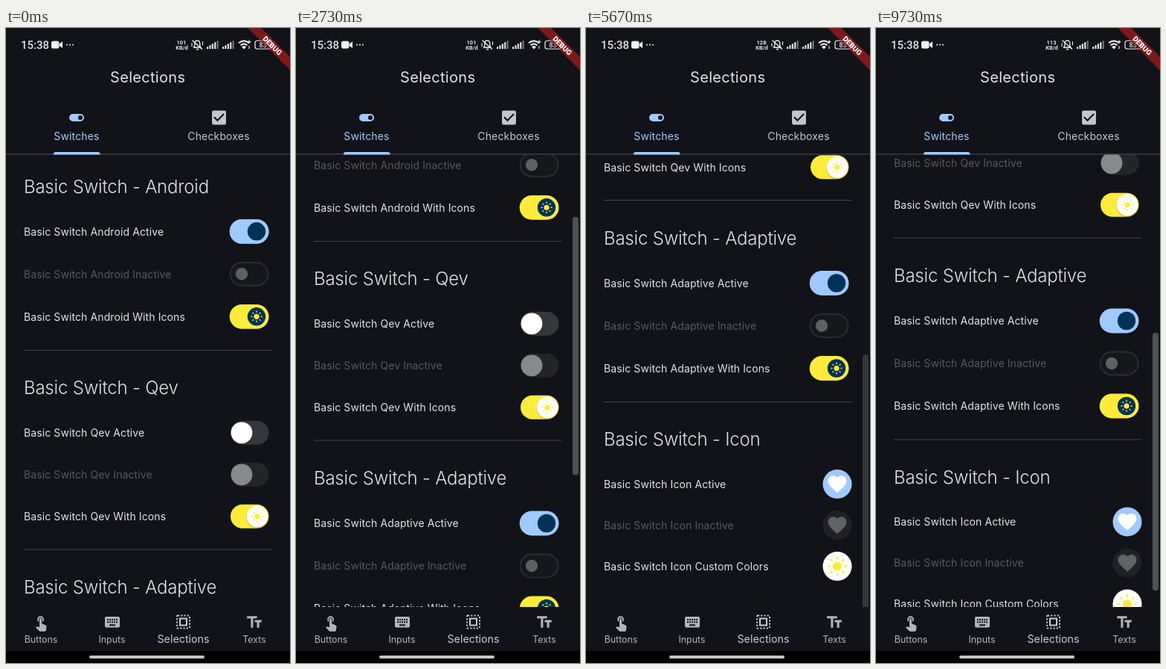
An HTML page that plays this animation: 382 by 850 pixels, repeating every 9760 ms.

```html
<!DOCTYPE html>
<html lang="en">
<head>
<meta charset="utf-8">
<title>Selections</title>
<style>
  html, body { margin: 0; width: 100%; height: 100%; overflow: hidden; background: #111318; }
  svg { display: block; }
  text { font-family: Inter, "Noto Sans", sans-serif; fill: #e2e2e9; }
  .heading { font-size: 24px; font-weight: 300; letter-spacing: -.2px; }
  .row { font-size: 14px; letter-spacing: .1px; }
  .off { fill: #58595d; }
  .mid { text-anchor: middle; }
  .status { font-family: Roboto, sans-serif; font-weight: 500; }
  .rate { font-size: 7.5px; font-weight: 700; }
  .banner { font: 900 9.9px Roboto, sans-serif; fill: #fff; }
</style>
</head>
<body>
<svg id="stage" width="382" height="850" viewBox="0 0 382 850"></svg>
<script>
const LOOP = 9760;
const BG = '#111318', BLUE = '#a0c9ff', NAVY = '#003258', YELLOW = '#ffeb3b', GREY = '#c3c6cf', LINE = '#43474e';

const text = (x, y, s, cls = '', attrs = '') => `<text x="${x}" y="${y}" class="${cls}" ${attrs}>${s}</text>`;
const rect = (x, y, w, h, r, fill, attrs = '') =>
  `<rect x="${x}" y="${y}" width="${w}" height="${h}" rx="${r}" fill="${fill}" ${attrs}/>`;
const circle = (x, y, r, fill, attrs = '') => `<circle cx="${x}" cy="${y}" r="${r}" fill="${fill}" ${attrs}/>`;
const stroke = (d, color, width, attrs = '') =>
  `<path d="${d}" fill="none" stroke="${color}" stroke-width="${width}" ${attrs}/>`;
// 24-unit icon centred on x, y
const icon = (d, x, y, fill, scale = 1, attrs = '') =>
  `<path d="${d}" fill="${fill}" transform="translate(${x} ${y}) scale(${scale}) translate(-12 -12)" ${attrs}/>`;

const TOGGLE = 'M17 7H7a5 5 0 0 0 0 10h10a5 5 0 0 0 0-10zm0 8a3 3 0 1 1 0-6 3 3 0 0 1 0 6z';
const CHECK = 'M19 3H5a2 2 0 0 0-2 2v14a2 2 0 0 0 2 2h14a2 2 0 0 0 2-2V5a2 2 0 0 0-2-2zm-9 14l-5-5 1.4-1.4L10 14.2l7.6-7.6L19 8z';
const HEART = 'M12 21.35l-1.45-1.32C5.4 15.36 2 12.28 2 8.5 2 5.42 4.42 3 7.5 3c1.74 0 3.41.81 4.5 2.09C13.09 3.81 14.76 3 16.5 3 19.58 3 22 5.42 22 8.5c0 3.78-3.4 6.86-8.55 11.54z';
const TOUCH = 'M9 11.2V7.5a2.5 2.5 0 0 1 5 0v3.7a4.5 4.5 0 1 0-5 0zm9.8 4.7l-4.5-2.3-.5-.1H13v-6a1.5 1.5 0 0 0-3 0v10.7l-3.4-.7q-.6-.1-1 .3l-.8.8 4.9 5q.5.4 1.1.4h6.8q1.2-.1 1.4-1.3l.8-5.3q0-1-1-1.5z';
const LETTERS = 'M2.5 4v3h5v12h3V7h5V4zm19 5h-9v3h3v7h3v-7h3z';

function sun(x, y, scale, color) {
  let rays = '';
  for (let i = 0; i < 8; i++) rays += `<path d="M0-6V-8.3" transform="rotate(${i * 45})"/>`;
  return `<g transform="translate(${x} ${y}) scale(${scale})" stroke="${color}" stroke-width="1.6">${rays}${circle(0, 0, 3.9, color, 'stroke="none"')}</g>`;
}

// Right-hand controls, each centred on y
const track = (y, fill, attrs = '') => rect(300.7, y - 16.4, 52.8, 32.8, 16.4, fill, attrs);
const pill = (y, fill) => rect(302, y - 16, 51.5, 32, 16, fill);
const badge = (y, fill, attrs = '') => circle(338, y, 19.5, fill, attrs);
const raised = (x, y) => circle(x, y + 1.2, 15.2, '#0002') + circle(x, y, 14.4, '#fff');
const outlined = (y, fill, line) =>
  rect(301.7, y - 15.4, 50.8, 30.8, 15.4, fill, `stroke="${line}" stroke-width="2"`);
const controls = {
  live: y => outlined(y, '#33353a', '#8e9099') + track(y, BLUE, 'id="liveTrack"') + circle(337, y, 12.2, NAVY, 'id="liveThumb"'),
  on: y => track(y, BLUE) + circle(337, y, 12.2, NAVY),
  disabled: y => outlined(y, '#15171b', '#2c2d32') + circle(317, y, 8.2, '#5f6064'),
  sunny: y => track(y, YELLOW) + circle(337, y, 12.2, NAVY) + sun(337, y, .92, YELLOW),
  flat: y => pill(y, '#36373b') + raised(317, y),
  flatDisabled: y => pill(y, '#232529') + circle(317, y, 14.4, '#88898b'),
  flatSunny: y => pill(y, YELLOW) + raised(338, y) + sun(338, y, .92, YELLOW),
  heart: y => badge(y, BLUE, 'id="heartBadge"') + icon(HEART, 338, y, '#fff', 1.25, 'id="heart"'),
  heartDisabled: y => badge(y, '#1f2125') + icon(HEART, 338, y, '#616266', 1.25),
  sunBadge: y => badge(y, '#fff') + sun(338, y, 1.55, YELLOW)
};

const sections = [
  ['Android', 212, 272.3, 57, ['Active', 'live'], ['Inactive', 'disabled'], ['With Icons', 'sunny']],
  ['Qev', 481.5, 541.8, 56, ['Active', 'flat'], ['Inactive', 'flatDisabled'], ['With Icons', 'flatSunny']],
  ['Adaptive', 748.5, 809, 57, ['Active', 'on'], ['Inactive', 'disabled'], ['With Icons', 'sunny']],
  ['Icon', 1018, 1078, 55, ['Active', 'heart'], ['Inactive', 'heartDisabled'], ['Custom Colors', 'sunBadge']]
];

function list() {
  let out = '';
  for (const [name, top, first, step, ...rows] of sections) {
    out += text(24, top + 8.5, 'Basic Switch - ' + name, 'heading');
    rows.forEach(([label, kind], i) => {
      const y = first + i * step;
      out += text(24, y + 5.2, `Basic Switch ${name} ${label}`, label === 'Inactive' ? 'row off' : 'row') + controls[kind](y);
    });
  }
  for (const y of [431.5, 698, 968]) out += rect(24, y - .5, 333.5, 1, 0, LINE);
  return out;
}

function signal(x) {
  let out = '';
  for (let i = 0; i < 5; i++) out += rect(x + i * 3.4, 25 - i * 2, 2.1, 3 + i * 2, .5, i < 4 ? '#e8e8e8' : '#777');
  return out;
}

function statusBar() {
  const ink = '#f2f2f2';
  return text(20, 28, '15:38', 'status', 'font-size="15"') +
    rect(61, 17.5, 10.5, 10, 2.5, ink) + `<path d="M72 21l4-3v9l-4-3z" fill="${ink}"/>` +
    [82, 86, 90].map(x => circle(x, 22.5, 1, ink)).join('') +
    text(236, 21.7, '', 'status mid rate', 'id="rate"') + text(236.5, 29.2, 'KB/d', 'status mid rate') +
    stroke('M252.5 26h9.5l-1.2-2.5V21q0-3.800-3.500-4.300-3.500.5-3.500 4.300v2.500zM256 28.500h3M250.500 16.500l13.500 12', ink, 1.3) +
    stroke('M250 20v5M264.500 18v5', ink, 1.1) +
    signal(270) + signal(291) +
    stroke('M313 20q7-5.500 14 0M315.500 23q4.500-3.500 9 0', ink, 2) + `<path d="M317 25q3-2 6 0l-3 3.500z" fill="${ink}"/>` +
    stroke('M327 16v5M324.500 18.500h5M327 24v4', ink, 1.1) +
    rect(335, 17, 22, 11, 3, 'none', `stroke="${ink}" stroke-width="1.2"`) + rect(358.5, 20.5, 1.5, 4, .7, ink) +
    text(345.5, 26, '83', 'status mid', 'font-size="9"') +
    `<g transform="translate(382 0) rotate(45)">${rect(-42, 27.3, 84, 12.6, 0, '#b71c1c', 'opacity=".65"')}
     ${text(0, 37, 'DEBUG', 'mid banner')}</g>`;
}

function tabs() {
  return text(190.7, 73, 'Selections', 'mid', 'font-size="20" letter-spacing=".3"') +
    icon(TOGGLE, 95, 120, BLUE) + icon(CHECK, 286.5, 120, GREY, 1.05) +
    text(95, 149.5, 'Switches', 'mid', `font-size="14" letter-spacing=".15" style="fill:${BLUE}"`) +
    text(286, 149.5, 'Checkboxes', 'mid', `font-size="14" letter-spacing=".15" style="fill:${GREY}"`) +
    rect(0, 168.3, 382, 1.2, 0, LINE) +
    `<path d="M64 169.500v-.5q0-3 3-3h56.500q3 0 3 3v.5z" fill="${BLUE}"/>`;
}

function navBar() {
  const ink = '#b4b5b9', picked = '#c5cbdc';
  const label = (x, s, size, fill) => text(x, 822.5, s, 'mid', `font-size="${size}" style="fill:${fill}"`);
  return rect(0, 775, 382, 59, 0, BG) + rect(0, 834, 382, 16, 0, '#000') + rect(112, 840, 155, 4, 2, '#c4c4c4') +
    icon(TOUCH, 47, 796, ink, .97) +
    rect(133, 788, 20, 14.5, 2, ink) +
    stroke('M136 792h14M136 795.200h14', BG, 2, 'stroke-dasharray="2 1"') + stroke('M139 799.300h8', BG, 2) +
    rect(230, 786.5, 17, 17, 1, 'none', `stroke="${picked}" stroke-width="2" stroke-dasharray="2.1 2.15"`) +
    rect(234, 790.5, 9, 9, 0, 'none', `stroke="${picked}" stroke-width="2"`) +
    icon(LETTERS, 334, 795.5, ink, 1.03) +
    label(47, 'Buttons', 12.4, ink) + label(142.5, 'Inputs', 12.4, ink) +
    label(238.5, 'Selections', 14.3, picked) + label(334, 'Texts', 12.4, ink);
}

document.getElementById('stage').innerHTML =
  `<clipPath id="view">${rect(0, 169, 382, 606, 0, '#000')}</clipPath>` +
  rect(0, 0, 382, 850, 0, BG) +
  `<g clip-path="url(#view)"><g id="list">${list()}</g>${rect(372, 0, 8, 345, 3, '#e2e2e9', 'id="bar"')}</g>` +
  tabs() + navBar() + statusBar();

const el = id => document.getElementById(id);
const [listEl, bar, liveTrack, liveThumb, heart, heartBadge, rate] =
  ['list', 'bar', 'liveTrack', 'liveThumb', 'heart', 'heartBadge', 'rate'].map(el);

const progress = (t, start, end) => Math.min(1, Math.max(0, (t - start) / (end - start)));
const easeOut = p => 1 - (1 - p) ** 3;
const smooth = p => p * p * (3 - 2 * p);
const mix = (a, b, p) => `rgb(${a.map((v, i) => Math.round(v + (b[i] - v) * p))})`;

// Scroll moves: start, end, distance
const moves = [[1900, 2730, 146], [3910, 4345, 310], [5500, 5670, 11.5], [5730, 6970, -11.5], [8950, 9730, -39]];
// Scrollbar fades in and out
const fades = [[1900, 3420], [3910, 5000], [5500, 7580], [8950, LOOP]];

function draw(t) {
  const scroll = moves.reduce((sum, [a, b, d]) => sum + d * easeOut(progress(t, a, b)), 0);
  listEl.setAttribute('transform', `translate(0 ${-scroll})`);
  bar.setAttribute('y', 169.5 + scroll * .572);
  const shown = fades.reduce((sum, [a, b]) => sum + progress(t, a, a + 300) - progress(t, b, b + 300), 0);
  bar.setAttribute('opacity', .3 * shown);

  const p = smooth(progress(t, 880, 1180));
  liveTrack.setAttribute('opacity', 1 - p);
  liveThumb.setAttribute('cx', 337 - 20 * p);
  liveThumb.setAttribute('r', 12.2 - 4 * p);
  liveThumb.setAttribute('fill', mix([0, 50, 88], [197, 198, 208], p));

  const released = t >= 8270 && t < 8450;
  heartBadge.setAttribute('fill', released ? '#33353a' : BLUE);
  heart.setAttribute('fill', released ? GREY : '#fff');
  rate.textContent = t < 3400 ? '101' : t < 7000 ? '128' : '113';
}

function frame() {
  draw(performance.now() % LOOP);
  requestAnimationFrame(frame);
}
frame();
</script>
</body>
</html>
```
